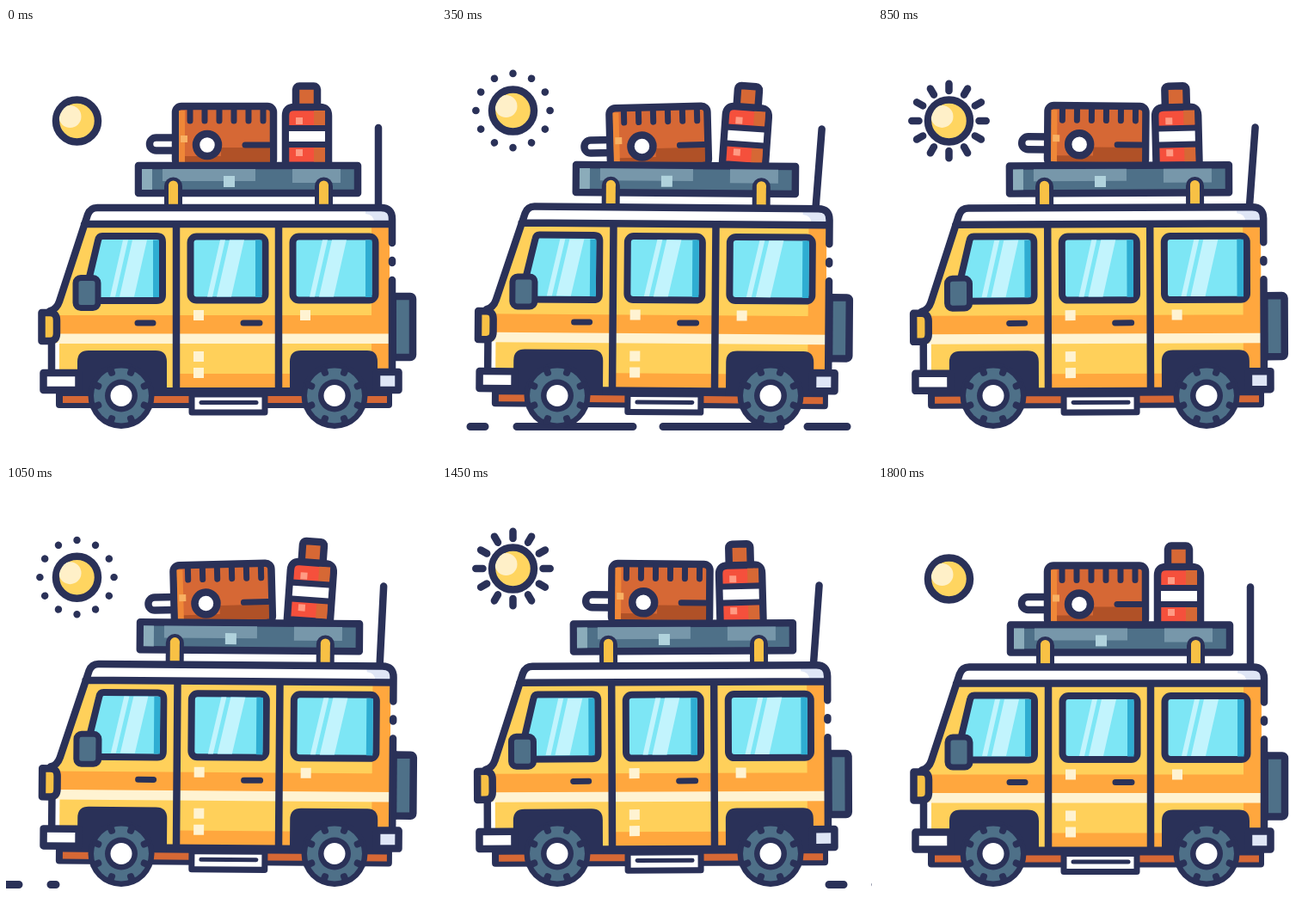
Animation of 500x500 px, one loop 1.85 s. Source, as an HTML page:

```html
<!DOCTYPE html>
<html lang="en">
<head>
<meta charset="utf-8">
<title>Road trip van</title>
<style>
  html, body { margin: 0; width: 100%; height: 100%; overflow: hidden; background: #fff; }
  svg { display: block; width: 100%; height: 100%; }
  .ink { fill: #2a3158; }
  .line { fill: none; stroke: #2a3158; stroke-width: 8.5; stroke-linecap: round; stroke-linejoin: round; }
  .box { stroke: #2a3158; stroke-width: 8.5; stroke-linejoin: round; }
  .glass { fill: #7de6f5; stroke: #2a3158; stroke-width: 8; stroke-linejoin: round; }
  .glint { fill: #c2f4fd; }
  .tint { fill: #2fadd2; }
  .slate { fill: #4e7088; }
  .yellow { fill: #ffd05a; }
  .orange { fill: #ffa73e; }
  .cream { fill: #fff3d2; }
  .gold { fill: #f8c145; }
  .rust { fill: #d66835; }
  .dark { fill: #b05127; }
  .red { fill: #f5503c; }
  .white { fill: #fff; }
  .pale { fill: #dfe6f6; }
  .thin { stroke-width: 7px; }
</style>
</head>
<body>
<svg viewBox="0 0 500 500">
  <defs>
    <clipPath id="shell"><path d="M92 226L62 318L54 330V421H446V226Z"/></clipPath>
    <clipPath id="disc"><circle r="21"/></clipPath>
    <g id="wheel">
      <circle r="38.5" class="ink"/>
      <circle r="32" class="slate"/>
      <g id="knobs"></g>
      <circle r="19" class="ink"/>
      <circle r="12.5" class="white"/>
    </g>
    <g id="post">
      <path d="M0 208V184" class="line" style="stroke-width:21"/>
      <path d="M0 205V182" fill="none" stroke="#f8c145" stroke-width="11"/>
      <circle cy="183" r="5.500" class="gold"/>
    </g>
  </defs>

  <g id="sun">
    <path id="rays" class="line"/>
    <circle r="24.5" class="box" fill="#ffd560"/>
    <g clip-path="url(#disc)"><circle cx="-8" cy="-5" r="13" fill="#fff0c8"/></g>
  </g>

  <path id="road" class="line" style="stroke-width:9"/>

  <g id="log">
    <rect x="167" y="127.500" width="40" height="15" rx="7.500" class="box white"/>
    <rect x="197" y="91" width="114" height="69" rx="7" class="box rust"/>
    <path d="M201 96H208V156H201Z" fill="#ef8738"/>
    <path d="M208 149H250V139H307V156H208Z" class="dark"/>
    <rect x="203" y="125" width="8" height="8" fill="#f8b163"/>
    <path id="teeth" class="line thin"/>
    <path d="M278 136H306" class="line thin"/>
    <circle cx="234" cy="136" r="13" class="box white"/>
  </g>

  <g id="bottle">
    <rect x="337" y="67.500" width="25" height="28" rx="4" class="box rust"/>
    <path d="M325 160V102Q325 92 335 92H365Q375 92 375 102V160Z" class="box red"/>
    <path d="M358 96H371V113H358ZM358 139H371V156H358Z" class="rust"/>
    <path d="M337 104h8v8h-8zM337 141h8v8h-8z" fill="#ff9a83"/>
    <path d="M325 113H375V139H325Z" class="ink"/>
    <path d="M329 120H371V132H329Z" class="white"/>
  </g>

  <g id="van">
    <path id="aerial" d="M433 208V116" class="line"/>

    <rect x="154" y="160" width="255" height="32" class="box slate"/>
    <path d="M182 164H290V178H182ZM333 164H389V180H333Z" fill="#7797aa"/>
    <path d="M158 164H170V188H158Z" fill="#8bacba"/>
    <rect x="253" y="172" width="13" height="13" fill="#b0d2dc"/>
    <use href="#post" x="194.500"/>
    <use href="#post" x="369.500"/>

    <rect x="449" y="312" width="24" height="71" rx="3" class="box slate"/>
    <path d="M445 308H454V387H445Z" class="ink"/>

    <g clip-path="url(#shell)">
      <path d="M50 220H450V425H50Z" class="yellow"/>
      <path d="M50 334H450V356H50ZM202 402H450V425H202ZM425 220H450V425H425Z" class="orange"/>
      <path d="M60 355.500H450V367H60Z" class="cream"/>
      <path d="M54 366H62V400H54Z" class="white"/>
    </g>

    <path d="M91 228L95 217Q98 209 106 209H436Q449 209 449 222V228Z" class="white"/>
    <path d="M418 211H437Q447 212 447 226H428Q428 217 418 216Z" class="pale"/>
    <path d="M51 329Q59 327 62 318L95 217Q98 209 106 209H436Q449 209 449 222V250M449 270V273M449 293V398M91 228H447M53 364V402" class="line"/>
    <path d="M198 229V421M317 229V421" class="line"/>

    <path d="M112 242H175Q182 242 182 249V310Q182 317 175 317H98Q92 317 94 302L107 247Q108 242 112 242Z" class="glass"/>
    <rect x="214.500" y="242.500" width="87" height="74" rx="7" class="glass"/>
    <rect x="333.500" y="242.500" width="96" height="74" rx="7" class="glass"/>
    <path class="tint" d="M171 246.500H178V313H171ZM290 246.500H297.500V313H290ZM418 246.500H425.500V313H418Z"/>
    <g id="glints" class="glint"></g>

    <rect x="81" y="290.500" width="26" height="35" rx="6" class="slate box thin"/>
    <path d="M41.500 331H51Q59 331 59 340V355Q59 364 51 364H41.500Z" class="box gold"/>
    <path d="M153 343H171M276 343H295" class="line thin"/>
    <path class="cream" d="M218 328h12v12h-12zM342 328h12v12h-12zM218 376h12v12h-12zM218 395h12v12h-12z"/>

    <rect x="58" y="418" width="391" height="24" rx="4" class="ink"/>
    <path d="M83 430V388Q83 375 96 375H174Q187 375 187 388V430ZM330 430V388Q330 375 343 375H420Q432 375 432 388V430Z" class="ink"/>
    <path d="M66 428H110V436H66ZM165 428H214V436H165ZM303 428H345V436H303ZM410 428H443V436H410Z" class="rust"/>
    <rect x="43.500" y="401" width="41" height="20" class="box white"/>
    <rect x="431" y="400" width="25.500" height="21" class="box pale"/>
    <rect x="216" y="426" width="85" height="21" class="box white thin"/>
    <path d="M227 435.500H291" class="line" style="stroke-width:5"/>
  </g>

  <use href="#wheel" x="134" y="427.500"/>
  <use href="#wheel" x="382" y="427.500"/>
</svg>
<script>
const LOOP = 1850, STEP = 50;
const SHAKE = LOOP / 3;   // van wobble and sun rays
const DRIVE = 900;        // road pass and sun bob
const el = id => document.getElementById(id);
const mix = (a, b, k) => a + (b - a) * k;
const ramp = (v, a, b) => Math.min(1, Math.max(0, (v - a) / (b - a)));
const cubic = k => k < .5 ? 4 * k ** 3 : 1 - 4 * (1 - k) ** 3;

// Rows: time in ms, then dx, dy, degrees
const poses = {
  van:    [[0, 0, 0, 0], [225, 0, 0, -.25], [350, 0, -.3, .45], [433, 0, -1, .45], [550, 0, 1.7, 0], [SHAKE, 0, 0, 0]],
  log:    [[0, 0, 0, 0], [225, 0, -.5, .5], [350, -1, 1, -1.5], [433, -1, 0, -1.5], [550, 0, 1.7, 0], [SHAKE, 0, 0, 0]],
  bottle: [[0, 0, 0, 0], [225, -1.5, 0, -1.5], [350, 1, 0, 4], [433, 2, -3, 4], [550, 0, 2.5, 0], [SHAKE, 0, 0, 0]],
  aerial: [[0, 0, 0, 0], [225, 0, 0, 4.4], [350, 0, 0, 4], [433, 0, 0, 2.4], [550, 0, 0, 0], [SHAKE, 0, 0, 0]]
};
const pivots = { van: "250 420", log: "253 157", bottle: "350 157", aerial: "433 206" };
const dashes = [[33, 50], [87, 222], [257, 394], [425, 471], [508, 514]];

el("teeth").setAttribute("d", [0, 1, 2, 3, 4, 5].map(i => `M${214 + i * 17} 94V108`).join(""));
el("glints").innerHTML = [136, 249, 368].map(x =>
  `<path d="M${x} 246.500h6l-15 66h-6zM${x + 11} 246.500h17l-15 66h-17z"/>`).join("");
el("knobs").innerHTML = Array.from({ length: 8 }, (_, i) =>
  `<rect x="-4" y="-36" width="8" height="11" rx="3.500" class="ink" transform="rotate(${i * 45 + 22.5})"/>`).join("");

function pose(id, ms) {
  const rows = poses[id];
  const i = rows.findIndex((r, n) => n && ms <= r[0]);
  const a = rows[i - 1], b = rows[i];
  const k = ramp(ms, a[0], b[0]), e = k * k * (3 - 2 * k);
  const [dx, dy, deg] = [1, 2, 3].map(n => mix(a[n], b[n], e));
  el(id).setAttribute("transform", `translate(${dx} ${dy}) rotate(${deg} ${pivots[id]})`);
}

function drawSun(drive, shake) {
  const half = drive / DRIVE * 2;
  const lift = cubic(half < 1 ? half : 2 - half);
  el("sun").setAttribute("transform", `translate(82.500 ${mix(108, 95.5, lift)})`);
  const inner = mix(35, 43, ramp(shake, .38, .56));
  const outer = mix(35, 43.2, ramp(shake, .08, .3));
  const width = 8.5 * ramp(shake, .04, .14) * (1 - ramp(shake, .7, .84));
  let d = "";
  for (let i = 0; i < 12; i++) {
    const c = Math.cos(i * Math.PI / 6), s = Math.sin(i * Math.PI / 6);
    d += `M${c * inner} ${s * inner}L${c * outer} ${s * outer}`;
  }
  el("rays").setAttribute("d", width > 0 ? d : "");
  el("rays").style.strokeWidth = width;
}

function drawRoad(ms) {
  const u = (ms - 350) / 200;
  const shift = 436.5 * u - 19.5 * u * u;
  el("road").setAttribute("d", dashes.map(([a, b]) => `M${a + shift} 463.500H${b + shift}`).join(""));
}

function frame(now) {
  const t = Math.floor(now % LOOP / STEP) * STEP;
  const shake = t % SHAKE, drive = t % DRIVE;
  Object.keys(poses).forEach(id => pose(id, shake));
  drawSun(drive, shake / SHAKE);
  drawRoad(drive);
}

const start = performance.now();
function tick() {
  frame(performance.now() - start);
  requestAnimationFrame(tick);
}
tick();
</script>
</body>
</html>
```
